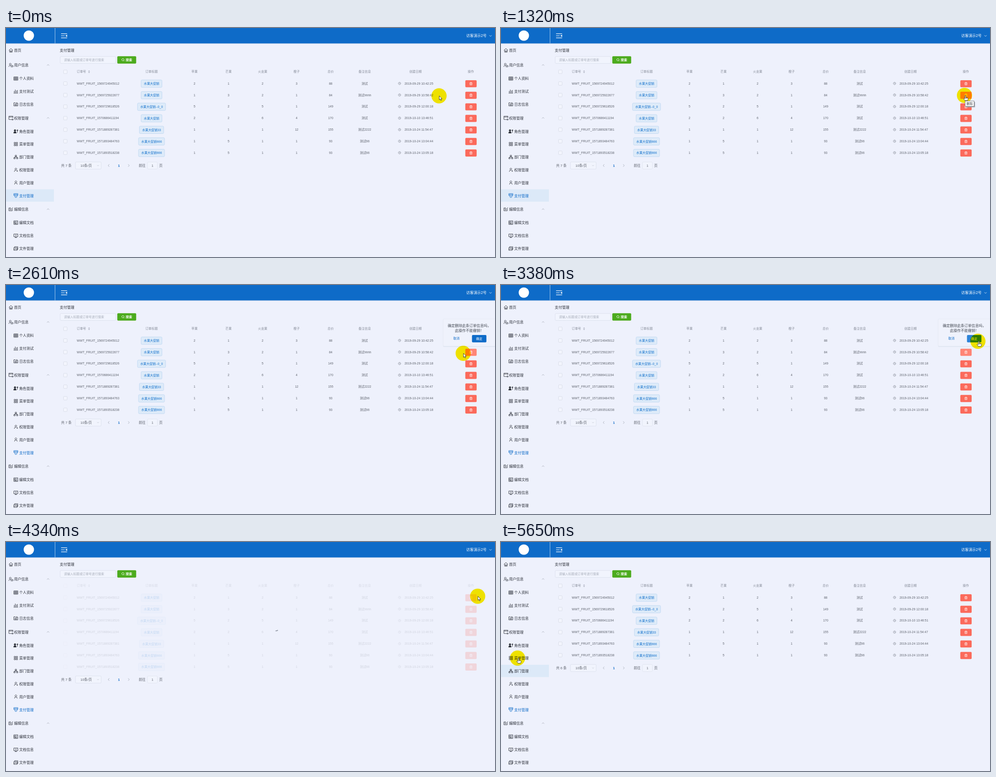
An HTML page that plays this animation: 1092x513 px, repeating every 5750 ms.

```html
<!DOCTYPE html>
<html>
<head>
<meta charset="utf-8">
<title>支付管理</title>
<style>
html, body { margin: 0; width: 100%; height: 100%; overflow: hidden; background: #eef1fc; }
svg { display: block; width: 100vw; height: 100vh; }
text { font-family: "Liberation Sans", "Noto Sans CJK SC", "Noto Sans CJK", sans-serif; white-space: pre; }
</style>
</head>
<body>
<svg id="stage" viewBox="0 0 1092 513"></svg>
<script>
const LOOP = 5750, BG = '#eef1fc', BLUE = '#0e6bc8', INK = '#30343d', GREY = '#5c616b', PALE = '#858b98';

// Runs of evenly spaced picture changes: first, last, count
const RUNS = [[100, 660, 6], [760, 1320, 6], [1550, 2090, 6], [2190, 2710, 6], [2820, 3140, 4],
  [3380, 3920, 6], [4030, 4580, 6], [4800, 5330, 6], [5440, 5650, 3]];
const TICKS = [0, ...RUNS.flatMap(([a, b, n]) => Array.from({length: n}, (_, i) => a + (b - a) * i / (n - 1)))];

// Pointer path: time, x, y, hand
const PATH = [[0, 967, 152, 0], [100, 967, 152, 0], [540, 1035, 151, 1], [1900, 1035, 151, 1],
  [2190, 1021, 153, 0], [2710, 1021, 153, 0], [3140, 1062, 127, 1], [3380, 1065, 126, 1],
  [3980, 1065, 126, 0], [4250, 1053.3, 121.5, 0], [4690, 1053.3, 121.5, 0], [5010, 17, 240, 1],
  [5440, 40, 288, 1], [5650, 37, 260, 1], [LOOP, 37, 260, 1]];

const MENU = [
  ['首页', 50, 'M-4.5 0L0-4L4.5 0M-3-1V4H3V-1M-1 4V1H1V4', 1],
  ['用户信息', 83, 'M-1.5-4a2 2 0 1 0 .1 0M-4.5 4Q-4 0-1 .5M0 1H4.5V4H0z', 2],
  ['个人资料', 113, 'M-4.5-3.5H4.5V4H-4.5zM-4.5-1H4.5M-4.5 1.5H4.5M-1.5-3.5V4M1.5-3.5V4'],
  ['支付测试', 142, 'M-3.6-1V3M-1.2-4V3M1.2-2V3M3.6-3V3M-5 4H5'],
  ['日志信息', 170.5, 'M-4.5-3H-1L0-2H4.5V4H-4.5zM-2 0V2.5H2V0zM2-4V-2'],
  ['权限管理', 201.5, 'M1 3.5H-4.5V-4H4.5V0M-4.5-2H4.5M2 2.5H5V4.5H2z', 2],
  ['角色管理', 231.5, 'M-2-4a2 2 0 1 0 .1 0M-5 4Q-5 .5-2 .5Q1 .5 1 4zM3.5-3.5a1.2 1.2 0 1 0 .1 0M3.5-1V3'],
  ['菜单管理', 260, 'M-3.8-3.8h3v3h-3zM.8-3.8h3v3h-3zM-3.8 .8h3v3h-3zM.8 .8h3v3h-3z'],
  ['部门管理', 289, 'M-1.5-4h3v2.5h-3zM-4.5 1.5h3V4h-3zM1.5 1.5h3V4h-3zM0-1.5V0M-3 1.5V0H3V1.5'],
  ['权限管理', 318, 'M0-4a2 2 0 1 0 .1 0M-3.5 4Q-3.5 .5 0 .5M1 2H4M3 1L4 2L3 4'],
  ['用户管理', 346.5, 'M0-4a2 2 0 1 0 .1 0M-3 4Q-3 .5 0 .5Q3 .5 3 4'],
  ['支付管理', 375.5, 'M-3-.5H-4.5V-4.5H4.5V-.5H3M-3-2.5V1Q-2.5 3.5 0 4.5Q2.5 3.5 3 1V-2.5zM-1.3-1L0 .5L1.3-1M0 .5V2.5'],
  ['编辑信息', 406, 'M3-1V3.5H-4.5V-3H0M-3-1H0M-3 1H1M1 0L4.5-4', 2],
  ['编辑文档', 436, 'M-4.5-4H4.5V4H-4.5zM-3-2H0V1H-3zM1.5-2H3M1.5 0H3M-3 2.5H3'],
  ['文档信息', 465, 'M-4.5-3.5H4.5V2.5H-4.5zM-2 0L0-1.5L1 0L2.5-1.5M0 2.5V4.5M-2.5 4.5H2.5'],
  ['文件管理', 494, 'M-4.5-2H3V4H-4.5zM-3-2V-4H4.5V2H3M-4 3L-1.5 0L0 2L1.5 .5L3 3']
];

const HEADS = [['订单标题', 325], ['苹果', 421], ['芒果', 497], ['火龙果', 573], ['橙子', 649],
  ['总价', 725], ['备注信息', 801], ['创建日期', 914.5], ['操作', 1038]];
const ROWS = `1569724945012|水果大促销|2|1|2|3|88|测试|2019-09-29 10:42:25
1569725922677|水果大促销|1|3|2|1|84|测试hhhh|2019-09-29 10:58:42
1569729618526|水果大促销--0_0|5|2|5|1|149|测试|2019-09-29 12:00:18
1570686411194|水果大促销|2|2|6|4|170|测试|2019-10-10 13:46:51
1571889287381|水果大促销33|1|1|1|12|155|测试2222|2019-10-24 11:54:47
1571893484763|水果大促销666|1|5|1|1|93|测试66|2019-10-24 13:04:44
1571893518238|水果大促销666|1|5|1|1|93|测试66|2019-10-24 13:05:18`.split('\n').map(r => r.split('|'));

const text = (x, y, s, size = 6.9, fill = GREY, anchor = 'middle', more = '') =>
  `<text x="${x}" y="${y + size * .36}" font-size="${size}" fill="${fill}" text-anchor="${anchor}" ${more}>${s}</text>`;
const left = (x, y, s, size, fill, more) => text(x, y, s, size, fill, 'start', more);
const box = (x, y, w, h, fill, stroke = 'none', r = 2) =>
  `<rect x="${x}" y="${y}" width="${w}" height="${h}" rx="${r}" fill="${fill}" stroke="${stroke}" stroke-width=".8"/>`;
const line = (x, y, d, stroke, width = .8, fill = 'none') =>
  `<path transform="translate(${x} ${y})" d="${d}" fill="${fill}" stroke="${stroke}" stroke-width="${width}"/>`;

// Linear track through [time, value] points
function track(t, keys, k = 1) {
  const i = Math.max(1, keys.findIndex(p => p[0] > t));
  if (t >= keys.at(-1)[0]) return keys.at(-1)[k];
  const a = keys[i - 1], b = keys[i], f = Math.max(0, (t - a[0]) / (b[0] - a[0]));
  return a[k] + (b[k] - a[k]) * f;
}

function header() {
  return `<rect y="34" width="1092" height="2" fill="#d5e0f1"/><rect width="1092" height="34.5" fill="${BLUE}"/>` +
    `<rect x="109" width="1" height="34.5" fill="#a9cbec"/><circle cx="51" cy="17" r="11.5" fill="#fff"/>` +
    line(123, 17.5, 'M0-4.7H13.5M0 0H8M0 4.7H13.5', '#fff', 1.2) + line(136.5, 17.5, 'M0-2.6V2.6L-4 0z', 'none', 0, '#fff') +
    text(1050.5, 17.5, '访客演示2号', 8.2, '#fff', 'middle', 'font-weight="500"') +
    line(1082, 17.5, 'M-2.5-1.2L0 1.3L2.5-1.2', '#fff');
}

function sidebar(t) {
  const late = t - 200, x = track(late, PATH, 1), y = track(late, PATH, 2);
  const lit = t < 2000 ? 375.5 : x < 107 ? y : -99;
  return MENU.map(([name, my, icon, group]) => {
    const active = my === 375.5, color = active ? BLUE : INK;
    const glow = !group && Math.abs(my - lit) < 14.3 ? box(0, my - 14, 107, 27.5, '#dce9f8', 'none', 0) : '';
    return glow + line(group ? 11 : 22, my, icon, color, .9, my === 231.5 ? INK : 'none') +
      left(group ? 18 : 29.5, my + .3, name, 8.1, color) +
      (group === 2 ? line(94, my, 'M-2.5 1.2L0-1.3L2.5 1.2', '#9197a3', .7) : '');
  }).join('');
}

function search() {
  return left(120, 50, '支付管理', 8.2, INK) + box(121, 63.8, 124, 15.6, '#f1f4fd', '#d9deea') +
    left(129.5, 71.5, '请输入标题或订单号进行搜索', 6.9, '#a6acb9') + box(248.5, 63.3, 42.2, 16.4, '#4cab1d') +
    line(261, 71.2, 'M0-2.7a2.5 2.5 0 1 0 .1 0M1.8 1.6L3.2 3', '#fff', .9) +
    text(274.5, 71.5, '搜索', 7.2, '#fff', 'middle', 'font-weight="700"');
}

const check = y => box(128.5, y - 3.9, 8, 8, '#f3f5fd', '#d3d8e4', 1.2);

function tag(y, s) {
  const w = 12 + [...s].reduce((n, c) => n + (c === '-' ? 2.3 : c < '~' ? 3.84 : 6.9), 0);
  return box(325 - w / 2, y - 7.8, w, 16.6, '#deebf9', '#b8d4f0') + text(325, y + .5, s, 6.9, '#1270cc');
}

function row(cells, i, hot) {
  const y = 124.2 + 25.87 * i, [id, title, ...rest] = cells, date = rest.pop();
  return check(y) + left(158, y, 'WWT_FRUIT_' + id) + tag(y, title) +
    rest.map((s, j) => text(421 + 76 * j, y, s)).join('') +
    line(878.8, y, 'M0-2.7a2.7 2.7 0 1 0 .1 0M0-1.5V.3H1.4', '#6d737e', .7) + left(890, y, date) +
    box(1025.7, y - 7.3, 25.3, 15.9, hot ? '#ff8576' : '#fb6a5b') +
    line(1038.3, y + .6, 'M-3-1.8H3M-1.2-1.8V-3H1.2V-1.8M-2.3-1.8V2.8H2.3V-1.8M-.7-.4V1.6M.7-.4V1.6', '#fff', .75);
}

function table(t, rows) {
  const fade = track(t, [[4000, 1], [4250, .2], [4470, .2], [4580, 1]]);
  const hot = t >= 480 && t < 4000;
  return `<g opacity="${fade}">` + check(98) + left(158, 98, '订单号', 6.9, PALE) +
    line(185.5, 98, 'M-2-.8L0-3L2-.8zM-2 .8L0 3L2 .8z', 'none', 0, '#a3a9b6') +
    HEADS.map(([s, x]) => text(x, 98, s, 6.9, PALE)).join('') +
    rows.map((r, i) => row(r, i, hot && i === 1)).join('') + '</g>';
}

function pager(n) {
  const y = 127 + 25.87 * n, arrow = '#9ba1ae';
  return left(123, y, `共 ${n} 条`, 7.6) + box(155, y - 8, 57.5, 16, '#f1f4fd', '#d9deea') + text(179, y, '10条/页', 7.5) +
    line(205.5, y, 'M-2-1L0 1L2-1', '#b5bac6', .7) + line(229.5, y, 'M1.2-2.8L-1.4 0L1.2 2.8', arrow) +
    text(252, y, '1', 7.6, BLUE, 'middle', 'font-weight="700"') + line(274, y, 'M-1.2-2.8L1.4 0L-1.2 2.8', arrow) +
    left(296.5, y, '前往', 7.6) + box(316, y - 8, 22, 16, '#f1f4fd', '#dde2ed') + text(327, y, '1', 7.2) + left(342, y, '页', 7.6);
}

function spinner(t) {
  if (t < 4100 || t >= 4560) return '';
  const len = Math.max(1, 5 + (t - 4340) * .03), turn = 52 + (t - 4340) * .18;
  return `<circle cx="602" cy="190" r="9.2" fill="none" stroke="#4a5160" stroke-width="1.1" ` +
    `stroke-dasharray="${len} 99" transform="rotate(${turn} 602 190)"/>`;
}

function tooltip(t) {
  return t < 1100 || t >= 1800 ? '' : box(1038.5, 165.5, 20, 12, '#9b9fa8', 'none', 0) +
    box(1036.5, 163.5, 20, 12, '#f8f8f8', '#6f7278', 0) + text(1046.5, 169.5, '删除', 6.9, '#44474d');
}

function confirmBox(t) {
  const show = track(t, [[1800, 0], [2000, 1], [3880, 1], [4040, 0]]), ink = '#454a54';
  return show <= 0 ? '' : `<g opacity="${show}">` + box(976, 77, 118, 61.5, '#dde3ef') + box(976, 76, 118, 61, '#eff2fc', '#e2e8f2') +
    left(986.5, 90.8, '确定删除此条订单信息吗，', 8.05, ink) + left(1002.5, 102, '此操作不能撤销！', 8.05, ink) +
    text(1006, 120, '取消', 6.9, BLUE) + box(1040.6, 112, 32.2, 16.5, t >= 3100 ? '#2d83d8' : BLUE) +
    text(1056.7, 120, '确定', 7, '#fff') + '</g>';
}

function pointer(t) {
  const x = track(t, PATH, 1), y = track(t, PATH, 2), hand = PATH.findLast(p => p[0] <= t)[3];
  return `<circle cx="${x}" cy="${y}" r="17" fill="#ffee00" style="mix-blend-mode:multiply"/>` + (hand
    ? line(x + 1, y - .5, 'M0 1Q1-.5 2 1V5L6 6Q7.3 6.5 7 8.5L6 12H0L-3 8Q-3 6.5-1.5 7L0 8zM2.2 5V7.5M4.2 5.6V7.5', '#222', .8, '#fff')
    : line(x + .5, y, 'M0 0V9L2.1 7.1L3.6 10.4L5 9.8L3.6 6.6H6.4z', '#222', .8, '#fff'));
}

function scene(t) {
  const rows = t < 4500 ? ROWS : ROWS.filter((_, i) => i !== 1);
  return `<rect width="1092" height="513" fill="${BG}"/>` + header() + sidebar(t) + search() +
    table(t, rows) + pager(rows.length) + spinner(t) + confirmBox(t) + pointer(t) + tooltip(t);
}

const stage = document.getElementById('stage'), start = performance.now();
let shown = -1;
function draw() {
  const t = (performance.now() - start) % LOOP, tick = TICKS.findLast(k => k <= t + 22);
  if (tick !== shown) stage.innerHTML = scene(shown = tick);
  requestAnimationFrame(draw);
}
draw();
</script>
</body>
</html>
```
